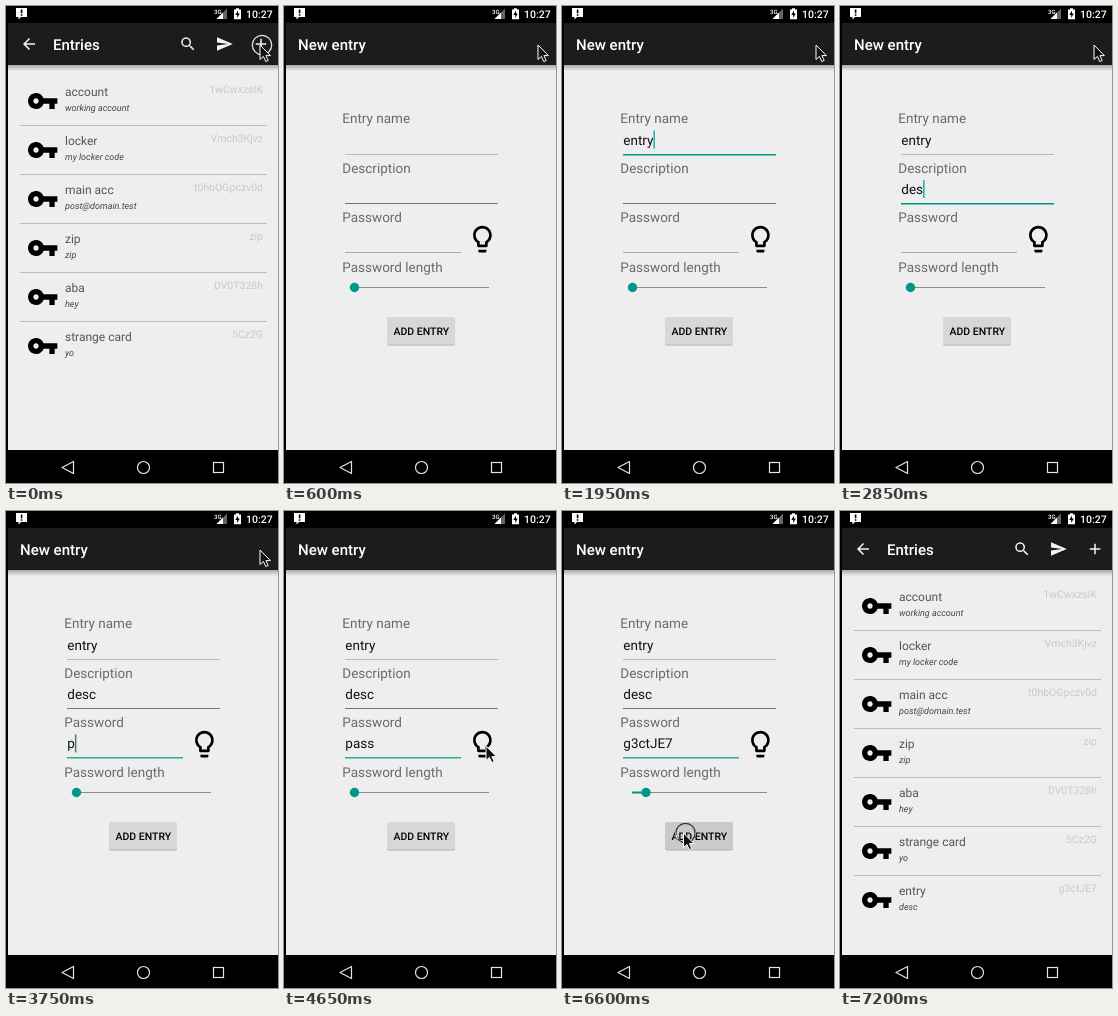
Write an HTML page that moves like this. It is 272 by 477 pixels and loops after 7560 ms.

```html
<!DOCTYPE html>
<html lang="en">
<head>
<meta charset="utf-8">
<title>Password entries</title>
<style>
  html, body { margin: 0; width: 100%; height: 100%; overflow: hidden; background: #000; }
  svg { display: block; width: 100vw; height: 100vh; }
  text { font-family: Roboto, sans-serif; text-rendering: geometricPrecision; white-space: pre; }
  .title { font-size: 15px; font-weight: 500; fill: #fff; }
  .name { font-size: 12px; fill: #555; }
  .note { font-size: 9px; font-style: italic; fill: #444; }
  .secret { font-size: 10.5px; fill: #c9c9c9; text-anchor: end; }
  .label { font-size: 13.5px; fill: #6a6a6a; }
  .input { font-size: 13.5px; fill: #111; }
  .button { font-size: 10.5px; font-weight: 500; fill: #000; text-anchor: middle; }
  .clock { font-size: 10.5px; font-weight: 500; fill: #fff; text-anchor: end; }
  #ring { fill: none; stroke: #fff; stroke-width: 1.3; mix-blend-mode: difference; }
</style>
</head>
<body>
<svg id="stage" viewBox="0 0 272 477">
  <defs>
    <linearGradient id="shade" x2="0" y2="1">
      <stop offset="0" stop-color="#000" stop-opacity=".3"/>
      <stop offset="1" stop-color="#000" stop-opacity="0"/>
    </linearGradient>
    <clipPath id="screen"><path d="M2 17H272V477H2Z"/></clipPath>
  </defs>
  <rect width="272" height="477"/>
  <g clip-path="url(#screen)">
    <g id="list"></g>
    <g id="form"></g>
  </g>
  <g id="system"></g>
  <g id="pointer">
    <circle id="ring" cx="2" cy="0" r="9.7"/>
    <path d="M0 0V14.5L3.4 11.4L5.8 16.6L8.2 15.5L5.9 10.6H10.4Z" fill="#111" stroke="#fff"/>
  </g>
</svg>
<script>
const LOOP = 7560, STEP = 150, TEAL = '#009688';
const $ = id => document.getElementById(id);

function add(parent, tag, attrs, content = '') {
  const el = document.createElementNS('http://www.w3.org/2000/svg', tag);
  for (const key in attrs) el.setAttribute(key, attrs[key]);
  el.textContent = content;
  parent.append(el);
  return el;
}
const rect = (p, x, y, width, height, fill) => add(p, 'rect', { x, y, width, height, fill });
const text = (p, cls, x, y, content) => add(p, 'text', { class: cls, x, y }, content);
const icon = (p, d, x, y, size, fill) =>
  add(p, 'path', { d, fill, transform: `translate(${x} ${y}) scale(${size / 24})` });

const ICONS = {
  key: 'M12.65 10C11.83 7.67 9.61 6 7 6c-3.31 0-6 2.69-6 6s2.69 6 6 6c2.61 0 4.83-1.67 5.65-4H17v4h4v-4h2v-4H12.65zM7 14c-1.1 0-2-.9-2-2s.9-2 2-2 2 .9 2 2-.9 2-2 2z',
  bulb: 'M9 21c0 .55.45 1 1 1h4c.55 0 1-.45 1-1v-1H9v1zm3-19C8.14 2 5 5.14 5 9c0 2.38 1.19 4.47 3 5.74V17c0 .55.45 1 1 1h6c.55 0 1-.45 1-1v-2.26c1.81-1.27 3-3.36 3-5.74 0-3.86-3.14-7-7-7zm2.85 11.1l-.85.6V16h-4v-2.3l-.85-.6C7.8 12.16 7 10.63 7 9c0-2.76 2.24-5 5-5s5 2.24 5 5c0 1.63-.8 3.16-2.15 4.1z',
  back: 'M20 11H7.83l5.59-5.59L12 4l-8 8 8 8 1.41-1.41L7.83 13H20z',
  search: 'M15.5 14h-.79l-.28-.27A6.5 6.5 0 1 0 13.73 14.43l.27.28v.79l5 4.99L20.49 19zM9.5 14A4.5 4.5 0 1 1 9.5 5A4.5 4.5 0 0 1 9.5 14z',
  send: 'M2 21L23 12 2 3V10L17 12 2 14z',
  plus: 'M19 13h-6v6h-2v-6H5v-2h6V5h2v6h6z'
};

function buildWindow(g, title, x) {
  rect(g, 0, 59, 272, 385, '#eee');
  rect(g, 0, 59, 272, 6, 'url(#shade)');
  rect(g, 0, 17, 272, 42, '#1c1c1c');
  rect(g, 0, 444, 272, 80, '#000');
  text(g, 'title', x, 44, title);
}

// Entry list
const list = $('list');
buildWindow(list, 'Entries', 47);
[['back', 14], ['search', 173], ['send', 209.5], ['plus', 246]]
  .forEach(([name, x]) => icon(list, ICONS[name], x, 29, 18, '#f4f4f4'));
const rows = [
  ['account', 'working account', '1wCwxzsIK'],
  ['locker', 'my locker code', 'Vmch3Kjvz'],
  ['main acc', 'post@domain.test', 't0hbOGpczv0d'],
  ['zip', 'zip', 'zip'],
  ['aba', 'hey', 'DV0T328h'],
  ['strange card', 'yo', '5Cz2G'],
  ['entry', 'desc', 'g3ctJE7']
].map(([name, note, secret], i) => {
  const row = add(list, 'g', { transform: `translate(0 ${i * 49})` });
  if (i) rect(row, 14, 70, 247, 1, '#bcbcbc');
  icon(row, ICONS.key, 20.7, 79, 32, '#000');
  text(row, 'name', 59, 90, name);
  text(row, 'note', 59, 105, note);
  text(row, 'secret', 257, 87, secret);
  return row;
});
const newRow = rows[rows.length - 1];

// Entry form
const form = $('form');
buildWindow(form, 'New entry', 14);
const fields = [
  ['Entry name', 117, 148, 214, '#bbb'],
  ['Description', 166.5, 197, 214, '#757575'],
  ['Password', 216, 246, 177, '#aaa']
].map(([label, y, lineY, right, idle]) => {
  text(form, 'label', 58.3, y, label);
  return {
    idle,
    line: rect(form, 61, lineY, right - 61, 1, idle),
    input: text(form, 'input', 61.3, lineY - 9.2, ''),
    caret: rect(form, 61, y + 7.5, 1.5, 18, TEAL)
  };
});
icon(form, ICONS.bulb, 182.4, 217.2, 32, '#000');
text(form, 'label', 58.3, 265.5, 'Password length');
rect(form, 70, 281, 135, 1, '#8c8c8c');
const filled = rect(form, 70, 280.5, 0, 2, TEAL);
const thumb = add(form, 'circle', { cy: 281.5, r: 4.7, fill: TEAL });
add(form, 'rect', { x: 103, y: 311.5, width: 68, height: 28, rx: 2, fill: '#aaa' });
const button = add(form, 'rect', { x: 103, y: 311, width: 68, height: 27.7, rx: 2 });
text(form, 'button', 137.3, 329, 'ADD ENTRY');

// Status and navigation bars
const system = $('system');
rect(system, 0, 0, 272, 17, '#000');
add(system, 'path', { d: 'M10 2H21V11H15L12.5 13.5V11H10Z', fill: '#fff' });
add(system, 'path', { d: 'M14.8 3.5H16.4V7.3H14.8ZM14.8 8.3H16.4V9.8H14.8Z', fill: '#000' });
add(system, 'text', { x: 208, y: 7.5, fill: '#fff', 'font-size': 6, 'font-weight': 500 }, '3G');
add(system, 'path', { d: 'M221 2.5V13H210.5Z', fill: '#666' });
add(system, 'path', { d: 'M217 6.5V13H210.5Z', fill: '#fff' });
add(system, 'path', { d: 'M228 3.5H230V2.3H233V3.5H235V13.3H228Z', fill: '#fff' });
add(system, 'path', { d: 'M232 4.5L229.3 9H231.2V12L233.8 7.6H232Z', fill: '#000' });
text(system, 'clock', 266.7, 12, '10:27');
const nav = { fill: 'none', stroke: '#e4e4e4', 'stroke-width': 1.2 };
add(system, 'path', { ...nav, d: 'M67.5 455.5V467.5L56 461.5Z', 'stroke-linejoin': 'round' });
add(system, 'circle', { ...nav, cx: 137.5, cy: 461.5, r: 6 });
add(system, 'rect', { ...nav, x: 207.5, y: 456.5, width: 10, height: 10 });

// Each table holds [start time, value...]
const typed = [
  [[0, ''], [1200, 'e'], [1350, 'en'], [1500, 'ent'], [1800, 'entr'], [1950, 'entry']],
  [[0, ''], [2550, 'd'], [2700, 'de'], [2850, 'des'], [3000, 'desc']],
  [[0, ''], [3750, 'p'], [3900, 'pa'], [4050, 'pas'], [4200, 'pass'],
   [4800, 'PFUwP'], [5850, 'k8RwZd'], [6000, 'g3ctJE7']]
];
const focus = [[0, 0], [2250, 1], [3450, 2]];
const lineLit = [[0, 0], [1050, 1]];
const caretOn = [[0, 0], [900, 1], [1050, 0], [1200, 1], [2250, 0], [2400, 1],
  [3450, 0], [3600, 1], [4500, 0]];
const sliderLength = [[0, 5], [5850, 6], [6000, 7]];
const formPose = [[0, 0, 0], [450, 8, .75], [600, 0, 1], [6900, 10, .8], [7050, 33, .3], [7200, 0, 0]];
const pointerPath = [
  [0, 254, 39], [4200, 252, 100], [4350, 245, 201], [4500, 222, 228], [4650, 202, 235],
  [4950, 200, 236], [5100, 170, 262], [5250, 125, 291], [5400, 98, 300], [5550, 87.5, 283],
  [5700, 71, 282], [5850, 78, 282], [6000, 85, 283], [6150, 97, 300], [6300, 112, 315], [6450, 121.5, 322]
];
const presses = [[0, 1], [150, 0], [4800, 1], [4950, 0], [5700, 1], [6150, 0], [6600, 1], [6750, 0]];

const at = (table, t) => table.findLast(row => row[0] <= t).slice(1);
const set = (el, attrs) => { for (const key in attrs) el.setAttribute(key, attrs[key]); };

function draw(t) {
  const [offset, alpha] = at(formPose, t);
  set(form, { transform: `translate(0 ${offset})`, opacity: alpha });
  set(newRow, { opacity: t >= 6750 ? 1 : 0 });

  const [active] = at(focus, t), [caretShown] = at(caretOn, t), [lit] = at(lineLit, t);
  fields.forEach(({ idle, line, input, caret }, i) => {
    const focused = i === active, bright = focused && lit;
    input.textContent = at(typed[i], t)[0];
    set(line, { fill: bright ? (i === 2 ? '#2aa9a0' : TEAL) : idle, height: bright ? 1.5 : 1 });
    set(caret, {
      x: 61.3 + input.getComputedTextLength(),
      opacity: focused && caretShown ? 1 : 0,
      fill: i === 2 ? '#53716e' : '#1fb0a6'
    });
  });

  const travel = (at(sliderLength, t)[0] - 5) * 6.75;
  set(filled, { width: travel });
  set(thumb, { cx: 70.5 + travel });
  set(button, { fill: t >= 6600 ? '#c9caca' : '#d6d7d7' });

  const [x, y] = at(pointerPath, t);
  set($('pointer'), { transform: `translate(${x} ${y})`, opacity: t < 7050 ? 1 : 0 });
  set($('ring'), { opacity: at(presses, t)[0] });
}

const start = performance.now();
function tick() {
  const t = (performance.now() - start) % LOOP;
  draw(Math.floor(t / STEP) * STEP);
  requestAnimationFrame(tick);
}
tick();
</script>
</body>
</html>
```
